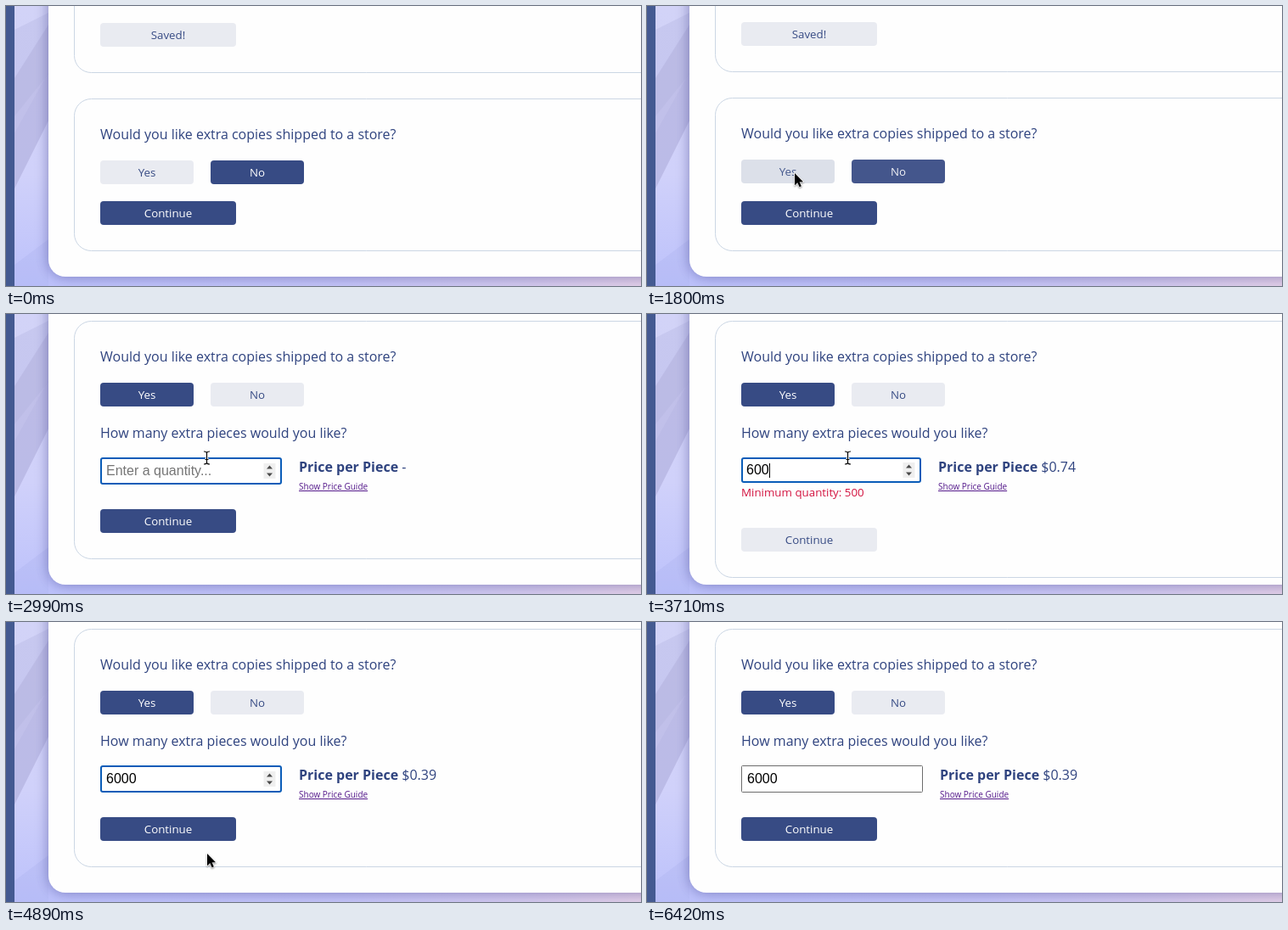
Animation, 748 px wide and 330 px high, one loop 6520 ms. Source, as an HTML page with a canvas:

```html
<!DOCTYPE html>
<html lang="en">
<head>
<meta charset="utf-8">
<title>Extra copies form</title>
<style>
  html, body { margin: 0; width: 100%; height: 100%; overflow: hidden; }
  canvas { display: block; width: 748px; height: 330px; }
</style>
</head>
<body>
<canvas id="stage"></canvas>
<script>
const W = 748, H = 330, LOOP = 6520;
const canvas = document.getElementById('stage');
const ctx = canvas.getContext('2d');
const dpr = window.devicePixelRatio || 1;
canvas.width = W * dpr;
canvas.height = H * dpr;

const SANS = '"Open Sans", "Noto Sans", sans-serif';
const ARIAL = '"Liberation Sans", Arial, sans-serif';
const NAVY = [55, 75, 132], HOVER = [63, 88, 155], PALE = [233, 235, 241], WHITE = [255, 255, 255];
const INK = '#2f437f';

const STEPS = [0, 480, 600, 720, 840, 960, 1080, 1200, 1320, 1440, 1800, 1920, 2040, 2160, 2280, 2400,
  2520, 2630, 2990, 3230, 3340, 3460, 3580, 3710, 3820, 3940, 4060, 4420, 4540, 4650, 4770, 4890,
  5010, 5120, 5240, 5470, 5710, 5830, 5950, 6070, 6420];

// Pointer: time, shape, x, y
const POINTER = [
  [0], [480, 'arrow', 566, 206], [600, 'arrow', 425, 206], [720, 'hand', 292, 202],
  [840, 'hand', 197, 199], [960, 'hand', 162, 198], [1080, 'hand', 183, 198],
  [1200, 'hand', 180, 198], [1320, 'hand', 176, 197], [1440, 'hand', 174, 197],
  [1800, 'arrow', 173, 196], [2280, 'ibeam', 205, 185], [2400, 'ibeam', 232, 172],
  [2520, 'ibeam', 236.5, 169.5], [4420, 'ibeam', 214, 135], [4540, 'arrow', 160, 152],
  [4650, 'arrow', 117, 268], [4770, 'arrow', 185, 290], [4890, 'arrow', 236, 272],
  [5010, 'arrow', 212, 259], [5120, 'hand', 197, 249], [5240, 'hand', 193, 246],
  [5710, 'hand', 222, 250], [5830, 'arrow', 345, 276], [5950, 'arrow', 570, 313], [6070]
];

const VALUES = [[0, ''], [3230, '6'], [3460, '60'], [3710, '600'], [3940, '6000']];
const PRICES = [[0, '-'], [3710, '$0.74'], [3940, '$0.39']];
const CARET_ON = [[2520, 2990], [3230, 4420], [5010, 5470], [5950, 6420]];

const clamp = v => Math.min(1, Math.max(0, v));
const within = (t, a, b) => t >= a && t < b;
const latest = (rows, t) => rows.filter(r => r[0] <= t).pop();
const swing = p => 0.5 - Math.cos(Math.PI * clamp(p)) / 2;
const smooth = p => Math.pow(Math.sin(clamp(p) * Math.PI / 2), 1.3);
const fade = (t, start, len) => smooth((t - start) / len);
const mix = (a, b, p) => a.map((v, i) => v + (b[i] - v) * p);
const rgb = c => `rgb(${c.map(Math.round).join()})`;

function roundRect(x, y, w, h, r) {
  ctx.beginPath();
  ctx.roundRect(x, y, w, h, r);
}

function poly(points, fill) {
  ctx.beginPath();
  points.forEach(([x, y]) => ctx.lineTo(x, y));
  ctx.closePath();
  ctx.fillStyle = fill;
  ctx.fill();
}

function text(str, x, y, size, color = INK, family = SANS, weight = 400, align = 'left') {
  ctx.font = `${weight} ${size}px ${family}`;
  ctx.textAlign = align;
  ctx.fillStyle = color;
  ctx.fillText(str, x, y);
  return ctx.measureText(str).width;
}

function button(label, x, y, w, bg, fg) {
  roundRect(x, y, w, 28, 4);
  ctx.fillStyle = rgb(bg);
  ctx.fill();
  text(label, x + w / 2, y + 19, 13.3333, rgb(fg), SANS, 400, 'center');
}

function background() {
  let g = ctx.createLinearGradient(0, 0, 0, H);
  g.addColorStop(0, '#d2d3f7');
  g.addColorStop(0.6, '#d0d1fa');
  g.addColorStop(1, '#bcc1fb');
  ctx.fillStyle = g;
  ctx.fillRect(0, 0, W, H);

  poly([[10, 28], [50, 8], [50, 80], [10, 130]], 'rgba(178,178,222,.35)');
  poly([[10, 85], [50, 22], [50, 135], [10, 215]], 'rgba(178,176,220,.5)');
  poly([[10, 150], [50, 78], [50, 135], [10, 215]], 'rgba(174,176,222,.3)');
  poly([[10, 305], [50, 275], [50, 330], [10, 330]], 'rgba(172,178,238,.35)');

  g = ctx.createLinearGradient(50, 0, W, 0);
  g.addColorStop(0, '#bcc1fb');
  g.addColorStop(0.5, '#c4c4f8');
  g.addColorStop(0.8, '#d3c9ee');
  g.addColorStop(1, '#e2cfe8');
  ctx.fillStyle = g;
  ctx.fillRect(50, 310, W - 50, 20);

  ctx.fillStyle = '#445a91';
  ctx.fillRect(0, 0, 10, H);

  ctx.save();
  ctx.beginPath();
  ctx.rect(10, 0, W, H);
  ctx.clip();
  ctx.shadowColor = 'rgba(50,50,125,.5)';
  ctx.shadowBlur = 16 * dpr;
  roundRect(50, -60, W + 60, 379, 20);
  ctx.fillStyle = '#fefefe';
  ctx.fill();
  ctx.restore();
}

function card(top, bottom) {
  roundRect(80.5, top + 0.5, W, bottom - top, 20);
  ctx.strokeStyle = '#cbd6e4';
  ctx.lineWidth = 1;
  ctx.stroke();
}

function quantityInput(t, y, small) {
  const w = small ? 212 : 214, h = small ? 30 : 32;
  const focused = within(t, 2520, 6420);
  const line = focused ? 2 : 1;
  roundRect(111 + line / 2, y + line / 2, w - line, h - line, focused ? 2 : 1);
  ctx.fillStyle = '#fff';
  ctx.fill();
  ctx.lineWidth = line;
  ctx.strokeStyle = focused ? '#0a5cb8' : '#6c6c6c';
  ctx.stroke();

  const value = latest(VALUES, t)[1];
  const x = small ? 117 : 118, base = y + (small ? 20 : 21);
  const width = value ? text(value, x, base, 16, '#000', ARIAL) : 0;
  if (!value) text('Enter a quantity...', x, base, 16, '#757575', ARIAL);
  if (CARET_ON.some(([a, b]) => within(t, a, b))) {
    ctx.fillStyle = '#000';
    ctx.fillRect(Math.round(x + width), y + (value ? 7 : 8), 1, 17);
  }

  if (focused) {
    const cx = 111 + w - 14.5, cy = y + h / 2;
    ctx.fillStyle = '#efefef';
    ctx.fillRect(cx - 7, cy - 9, 14, 18);
    for (const s of [-1, 1])
      poly([[cx - 3.5, cy + s * 2.5], [cx + 3.5, cy + s * 2.5], [cx, cy + s * 6.5]], '#4a4a4a');
  }
}

function extraPanel(t, top, height) {
  if (height <= 0) return;
  const small = within(t, 3340, 3940);
  ctx.save();
  ctx.beginPath();
  ctx.rect(81, top, W, height);
  ctx.clip();
  text('How many extra pieces would you like?', 111, top + 17, 16);
  quantityInput(t, top + 40, small);
  const x = small ? 343 : 345;
  const w = text('Price per Piece', x, top + 57, 16, INK, SANS, 700);
  text(' ' + latest(PRICES, t)[1], x + w, top + 57, 16);
  const link = text('Show Price Guide', x, top + 78, 10, '#551a8b');
  ctx.fillRect(x, top + 79, link, 1);
  if (within(t, 3340, 3820)) text('Minimum quantity: 500', 111, top + 86, 13.3333, '#d3123f');
  ctx.restore();
}

function outline(path, fill, stroke, width) {
  ctx.lineJoin = 'round';
  ctx.lineWidth = width;
  ctx.strokeStyle = stroke;
  ctx.stroke(path);
  ctx.fillStyle = fill;
  ctx.fill(path);
}

const ARROW = new Path2D('M1 1V15.2L4.3 12.1L6.6 17.2L8.8 16.2L6.5 11.2H11Z');
const HAND = new Path2D('M-2 1.6Q-1.6 0 0 .2Q1.4.4 1.8 2L2.5 5.6Q4.2 4.8 5.2 6.2Q6.8 5.6 7.8 7' +
  'Q9.8 6.8 10 9V11.5L8.4 14V16.4H.8V14.6L-1.8 11.6L-4.6 8.8Q-4.6 6.8-2.8 7.4L-.8 9Z');

const SHAPES = {
  arrow() {
    ctx.shadowColor = 'rgba(0,0,0,.3)';
    ctx.shadowBlur = 2 * dpr;
    ctx.shadowOffsetY = dpr;
    outline(ARROW, '#000', '#fff', 2);
  },
  hand() {
    outline(HAND, '#fff', '#000', 2);
    ctx.fillStyle = '#000';
    for (const x of [2, 4.3, 6.6]) ctx.fillRect(x, 10, 0.9, 4);
  },
  ibeam() {
    const bar = new Path2D('M-3.5-7.5Q-.5-7.5 0-6Q.5-7.5 3.5-7.5M0-6V6M-3.5 7.5Q-.5 7.5 0 6Q.5 7.5 3.5 7.5M-2 2H2');
    for (const [color, width] of [['#fff', 3], ['#000', 1.2]]) {
      ctx.strokeStyle = color;
      ctx.lineWidth = width;
      ctx.stroke(bar);
    }
  }
};

function pointer(t) {
  const [, shape, x, y] = latest(POINTER, t);
  if (!shape) return;
  ctx.save();
  ctx.translate(x, y);
  SHAPES[shape]();
  ctx.restore();
}

function draw(t) {
  const grow = Math.round(101 * swing((t - 1775) / 400));
  const picked = fade(t, 1775, 300);
  const error = within(t, 3340, 3820) ? 22 : 0;
  const noHover = fade(t, 620, 200) * (1 - fade(t, 830, 240));
  const goHover = fade(t, 5060, 180) * (1 - fade(t, 5730, 210));
  const disabled = fade(t, 3280, 300) * (1 - fade(t, 3810, 250));

  ctx.setTransform(dpr, 0, 0, dpr, 0, 0);
  background();

  card(-40 - grow, 78 - grow);
  button('Saved!', 111, 20 - grow, 160, PALE, NAVY);

  card(109 - grow, 288 + error);
  text('Would you like extra copies shipped to a store?', 111, 157 - grow, 16);
  button('Yes', 111, 182 - grow, 110, mix(PALE, NAVY, picked), mix(NAVY, WHITE, picked));
  button('No', 241, 182 - grow, 110, mix(mix(NAVY, HOVER, noHover), PALE, picked), mix(WHITE, NAVY, picked));
  extraPanel(t, 230 - grow, grow);
  button('Continue', 111, 230 + error, 160,
    mix(mix(NAVY, HOVER, goHover), PALE, disabled), mix(WHITE, NAVY, disabled));

  pointer(t);
}

function tick() {
  const t = performance.now() % LOOP;
  draw(STEPS.filter(s => s <= t).pop());
  requestAnimationFrame(tick);
}
tick();
</script>
</body>
</html>
```
